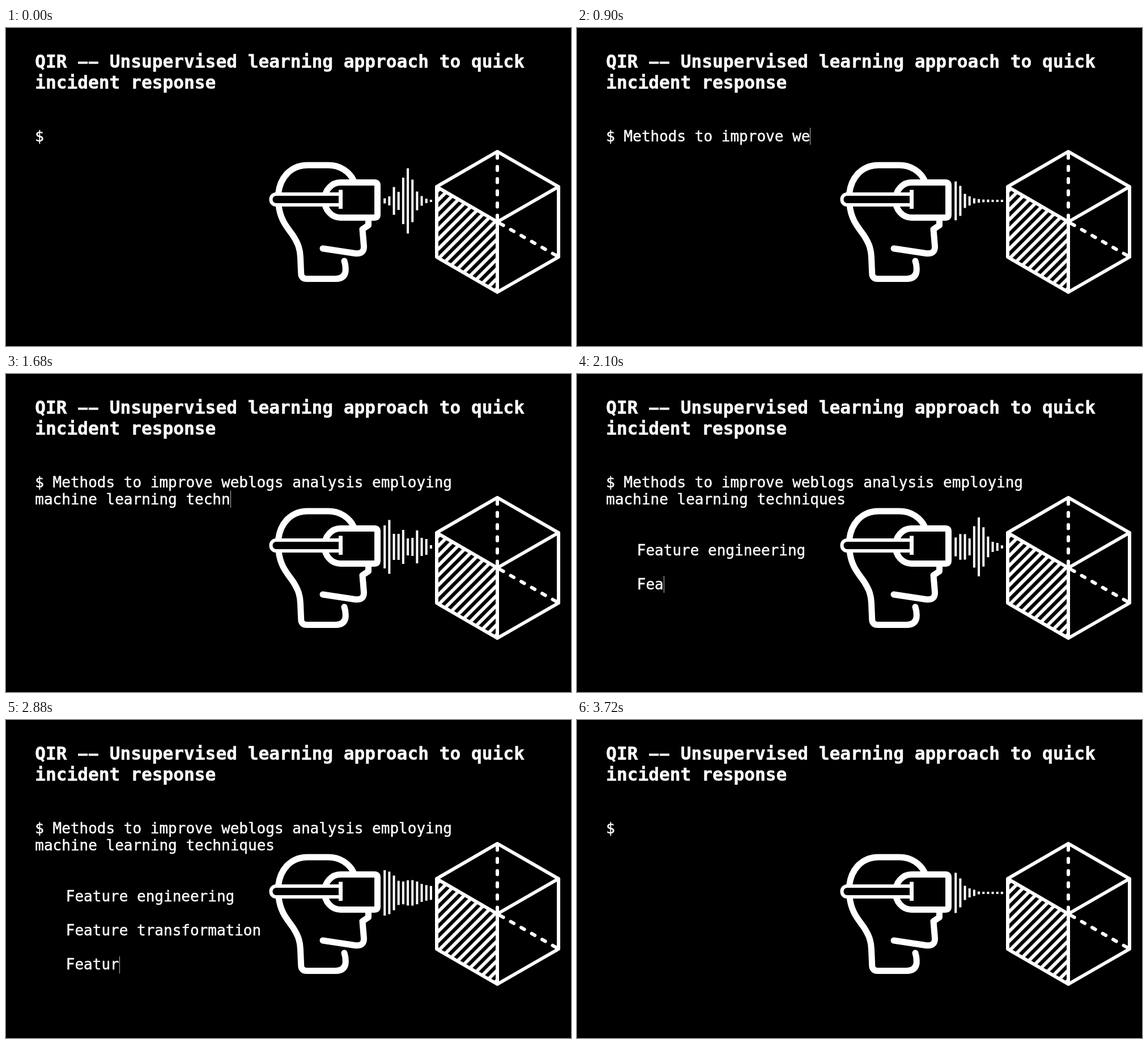
Animation, 997 px wide and 561 px high, one loop 3.75 s. Source, as an HTML page:

```html
<!DOCTYPE html>
<html lang="en">
<head>
<meta charset="utf-8">
<title>QIR</title>
<style>
  html, body { margin: 0; width: 100%; height: 100%; overflow: hidden; background: #000; }
  svg { display: block; width: 997px; height: 561px; }
  text { font: 26px "DejaVu Sans Mono", monospace; fill: #fff; stroke: #fff; stroke-width: .45px; white-space: pre; }
  .title { font-size: 31.2px; font-weight: bold; }
  .line { fill: none; stroke: #fff; stroke-linecap: round; stroke-linejoin: round; }
</style>
</head>
<body>
<svg viewBox="0 0 997 561">
  <defs>
    <!-- stripes run up to the right, first one through x + y = 1083.5 -->
    <pattern id="hatch" width="20" height="12.23" patternUnits="userSpaceOnUse"
             patternTransform="rotate(-45) translate(0 766.15)">
      <rect y="-3" width="20" height="6" fill="#fff"/>
      <rect y="9.23" width="20" height="6" fill="#fff"/>
    </pattern>
  </defs>

  <text class="title" x="51.2" y="70.2">QIR <tspan dy="1">−−</tspan><tspan dy="-1"> Unsupervised learning approach to quick</tspan></text>
  <text class="title" x="51.2" y="106.7">incident response</text>
  <text x="51.3" y="199.5">$</text>

  <!-- head -->
  <g class="line" stroke-width="11">
    <path d="M480.5 292C484 262 504 242 532 242H569C589 242 606 253 614 270"/>
    <path d="M481 312C484 340 497 352 507 367C516 381 519 391 519.5 405L520.7 433Q521 442.5 531 442.5H582Q597 442 599 430Q600 420 597 411"/>
    <path d="M559 389L617 397.7Q632 399 631.5 385L629 355L639.5 348V338"/>
    <path fill="#000" d="M590 272.5H651Q655.5 272.5 655.5 277V330Q655.5 334.5 651 334.5H590A28 31 0 0 1 590 272.5Z"/>
  </g>
  <path class="line" style="fill:#000" stroke-width="6" d="M590 293H476.500A9 9 0 0 0 467.500 302V303A9 9 0 0 0 476.500 312H590Z"/>
  <rect x="587" y="285.500" width="7" height="33.500" fill="#fff"/>

  <!-- cube -->
  <path fill="url(#hatch)" d="M760 280L867 342V466L760 404Z"/>
  <g class="line" stroke-width="6">
    <path d="M867 218L975 280V404L867 466L760 404V280ZM760 280L867 342L975 280M867 342V466"/>
    <path stroke-dasharray="6.5 15" d="M867 223V340"/>
    <path stroke-dasharray="6.5 14.8" d="M872 345L972 402"/>
  </g>

  <g id="wave" fill="#fff"></g>
  <g id="typed"></g>
  <rect id="caret" width="1" height="30" fill="#bbb"/>
</svg>
<script>
const LOOP = 3750, STEP = 30, CLEAR = 3480;
const CHAR = 15.65, BARS = 11, MID = 305;
const NS = "http://www.w3.org/2000/svg";
const $ = id => document.getElementById(id);
const clamp = v => Math.max(0, Math.min(1, v));

function add(parent, tag, attrs) {
  const el = document.createElementNS(NS, tag);
  for (const k in attrs) el.setAttribute(k, attrs[k]);
  return parent.appendChild(el);
}

// x, baseline, start, ms per character, text
const lines = [
  [82.6, 199.5, 538, 16.67, "Methods to improve weblogs analysis employing"],
  [51.3, 229.7, 1305, 16.67, "machine learning techniques"],
  [105.8, 320, 1757, 15, "Feature engineering"],
  [105.8, 380, 2043, 16.67, "Feature transformation"],
  [105.8, 440.2, 2770, 16.67, "Feature selection"]
].map(([x, y, start, pace, text]) =>
  ({ x, y, start, pace, text, el: add($("typed"), "text", { x, y }) }));

// time, then bar heights; missing bars rest as dots
const peak = [9, 16, 49, 32, 82, 115, 75, 33, 17, 8];
const keys = [
  [0, peak],
  [570, [80, 41, 18, 12]],
  [1260, [73, 51, 24, 23, 20, 10]],
  [1680, [76, 95, 46, 46, 60, 30, 32, 58, 32, 28, 6]],
  [2280, peak],
  [2520, [66, 62, 69, 60, 51, 46, 43, 52, 49, 41, 34]],
  [3240, [86, 61, 46, 45, 45, 35, 31, 27, 31, 22, 9]],
  [3720, [71, 51, 25, 16, 11, 5]]
];
const bars = Array.from({ length: BARS }, (_, i) =>
  add($("wave"), "rect", { x: 666.2 + i * 8.17, width: 4 }));

function drawWave(t) {
  let k = 0;
  while (k < keys.length - 2 && t >= keys[k + 1][0]) k++;
  const [t0, a] = keys[k], [t1, b] = keys[k + 1];
  const u = clamp((t - t0) / (t1 - t0));
  bars.forEach((bar, i) => {
    const from = a[i] || 4, to = b[i] || 4;
    const wobble = 0.22 * Math.sin(Math.PI * u) * Math.sin(t * 0.025 - i * 1.3);
    const h = Math.max(4, (from + (to - from) * u) * (1 + wobble));
    bar.setAttribute("y", MID - h / 2);
    bar.setAttribute("height", h);
  });
}

function caretAlpha(idle) {
  if (idle < 170) return clamp(1 - idle / 170);
  return clamp((idle - 240) / 60);
}

function drawText(t) {
  const shown = t < CLEAR;
  let active = lines[0];
  for (const l of lines) {
    const on = shown && t >= l.start;
    l.count = on ? Math.min(l.text.length, Math.floor((t - l.start) / l.pace)) : 0;
    l.el.textContent = l.text.slice(0, l.count);
    if (on) active = l;
  }
  const caret = $("caret");
  const idle = t - active.start - active.text.length * active.pace;
  const alpha = !shown ? 0 : t < lines[0].start ? clamp((t - 300) / 100) : caretAlpha(idle);
  caret.setAttribute("x", Math.floor(active.x + active.count * CHAR + 0.5));
  caret.setAttribute("y", Math.round(active.y - 23.7));
  caret.setAttribute("opacity", alpha);
}

function frame() {
  const t = Math.floor(performance.now() % LOOP / STEP) * STEP;
  drawWave(t);
  drawText(t);
  requestAnimationFrame(frame);
}
frame();
</script>
</body>
</html>
```
